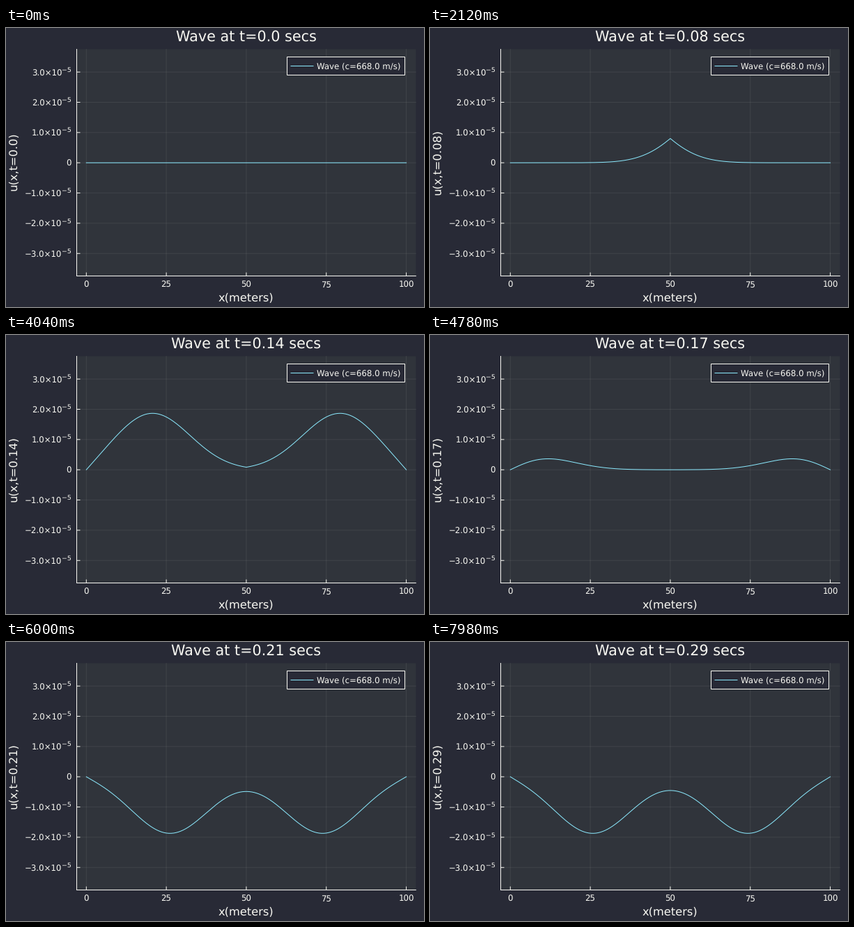
These frames come from a looping animation (600x400 px, 8 s). A matplotlib script:

```python
import matplotlib.pyplot as plt
import numpy as np
from matplotlib.animation import FuncAnimation
from matplotlib.patches import Rectangle

plt.rcParams.update({"font.family": "DejaVu Sans", "text.hinting": "none"})

WIDTH, HEIGHT, DPI = 600, 400, 100
PX = 72 / DPI  # points per pixel
BACK, PANEL, INK, CYAN = "#282a36", "#30343b", "#f8f8f2", "#8be9fd"
LEFT, RIGHT, TOP, BOTTOM = 101.5, 588.3, 30.5, 355.5
TITLE, GUIDE, TICK, POWER = 20.8, 16.3, 11.8, 9.4

INTERVAL, LOOP = 20, 8000
SPEED, LENGTH = 668.0, 100.0
PEAK, DELAY, SPREAD = 1.871, 0.1, 0.025  # height in 1e-5, times in seconds

fig = plt.figure(figsize=(WIDTH / DPI, HEIGHT / DPI), dpi=DPI, facecolor=BACK)
ax = fig.add_axes([0, 0, 1, 1])
ax.set(xlim=(0, WIDTH), ylim=(HEIGHT, 0))
ax.axis("off")


def to_px(x):
    return 115.3 + 4.5925 * x


def to_py(u):
    return 193.2 - 43.35 * u


def line(xs, ys, color=INK, width=1.0, **kw):
    return ax.plot(xs, ys, color=color, lw=width * PX, snap=False, **kw)[0]


def label(x, y, text, size, align="center", **kw):
    return ax.text(x, y, text, size=size * PX, color=INK, ha=align,
                   **{"va": "baseline", **kw})


def box(x0, y0, x1, y1, **kw):
    ax.add_patch(Rectangle((x0, y0), x1 - x0, y1 - y0, snap=False, **kw))


def draw_axes():
    box(LEFT, TOP, RIGHT, BOTTOM, facecolor=PANEL, lw=0)
    for x in range(0, 101, 25):
        px = to_px(x)
        line([px, px], [TOP, BOTTOM], alpha=0.08)
        line([px, px], [BOTTOM, BOTTOM - 4.5])
        label(px, 372, str(x), TICK)
    for u in range(-3, 4):
        py = to_py(u)
        line([LEFT, RIGHT], [py, py], alpha=0.08)
        line([LEFT, LEFT + 4.5], [py, py])
        if u == 0:
            label(93.5, py + 4.6, "0", TICK, "right")
        else:
            sign = "\u2212" if u < 0 else ""
            label(80.5, py + 5.2, f"{sign}{abs(u)}.0\u00d710", TICK, "right")
            label(94.3, py - 0.5, "\u22125", POWER, "right")
    line([LEFT, LEFT], [TOP, BOTTOM])
    line([LEFT, RIGHT], [BOTTOM, BOTTOM])
    label(344.5, 392, "x(meters)", GUIDE)


def draw_legend():
    box(403.5, 41.5, 572.5, 67.5, facecolor=BACK, edgecolor=INK, lw=PX,
        zorder=4)
    line([409, 441], [54.5, 54.5], CYAN, zorder=5)
    label(446, 58.4, "Wave (c=668.0 m/s)", TICK, "left", zorder=5)


def sim_time(ms):
    """Every 140 ms advances 5 ms of wave time, in three uneven steps."""
    cycle, offset = divmod(ms, 140)
    step = 1 if offset < 20 else 2 if offset < 120 else 4
    return (5 * cycle + step) / 1000


def wave(x, t):
    """Gaussian pulse from the middle; mirror sources give the fixed ends."""
    u = np.zeros_like(x)
    for n in range(-3, 4):
        distance = np.abs(x - LENGTH * (n + 0.5))
        arrival = t - distance / SPEED - DELAY
        u += (-1) ** n * np.exp(-(arrival / SPREAD) ** 2)
    return PEAK * u


draw_axes()
draw_legend()
grid = np.linspace(0, LENGTH, 401)
curve = line(to_px(grid), to_py(0 * grid), CYAN, zorder=3)
title = label(345, 18.6, "", TITLE)
guide = label(18.6, 191.6, "", GUIDE, "right", va="center", rotation=90)


def update(frame):
    t = sim_time(frame * INTERVAL)
    shown = round(t, 2)
    curve.set_ydata(to_py(wave(grid, t)))
    title.set_text(f"Wave at t={shown} secs")
    guide.set_text(f"u(x,t={shown})")
    return curve, title, guide


anim = FuncAnimation(fig, update, frames=LOOP // INTERVAL, interval=INTERVAL,
                     repeat=True, repeat_delay=0)
plt.show()
```
